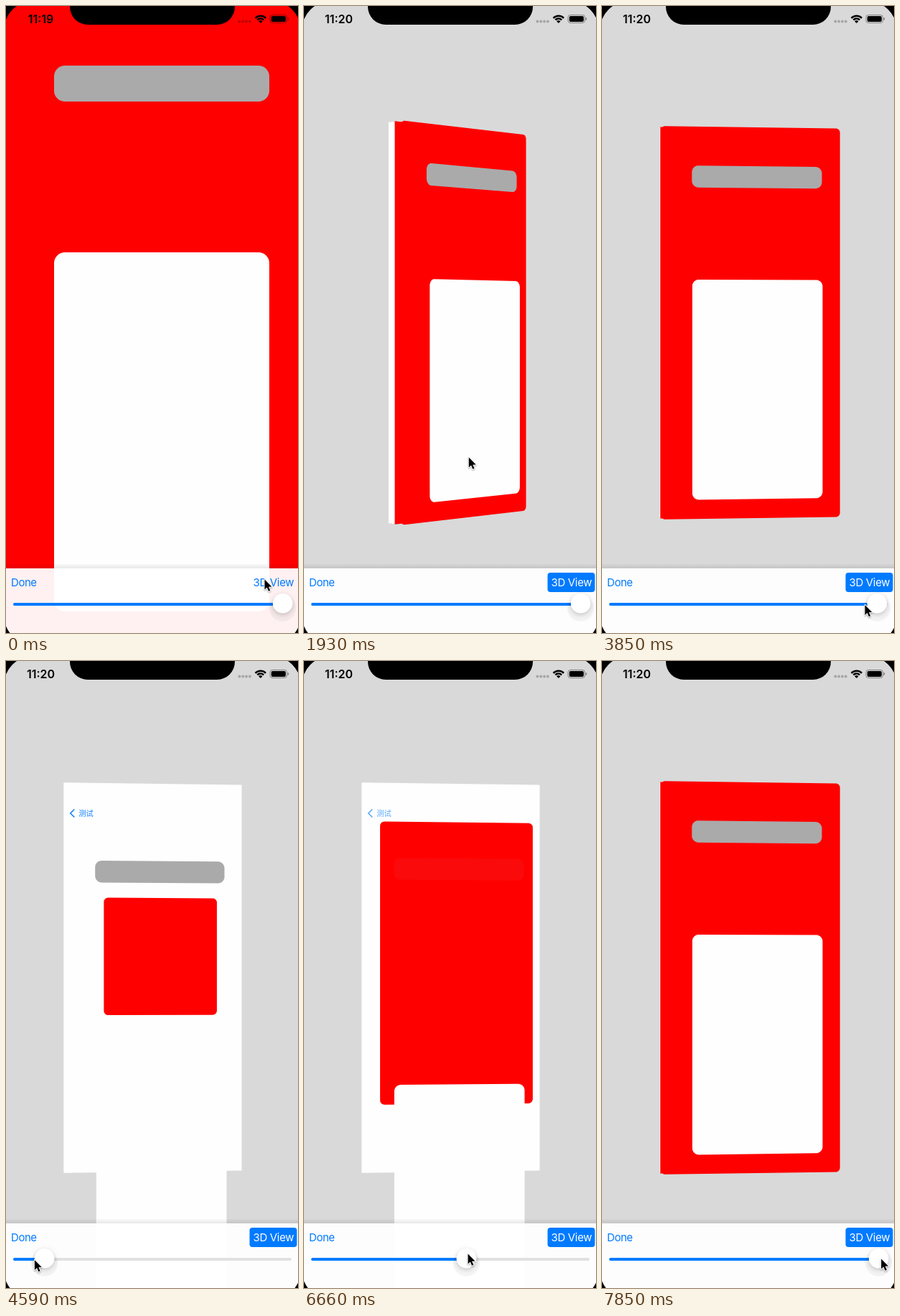
An HTML page with a canvas that plays this animation: 407 px wide and 873 px high, repeating every 8000 ms.

```html
<!DOCTYPE html>
<html lang="en">
<head>
<meta charset="utf-8">
<title>Layered transition inspector</title>
<style>
html, body { margin: 0; width: 100%; height: 100%; overflow: hidden; background: #000; }
canvas { display: block; width: 407px; height: 873px; }
</style>
</head>
<body>
<canvas id="stage"></canvas>
<script>
const W = 407, H = 873, LOOP = 8000;
const CX = 204, CY = 441, SW = 414, SH = 896;
const BLUE = '#007aff', RED = '#f00', WHITE = '#fefefe', GREY = '#aaa';
const canvas = document.getElementById('stage');
const dpr = window.devicePixelRatio || 1;
canvas.width = Math.round(W * dpr);
canvas.height = Math.round(H * dpr);
const g = canvas.getContext('2d');

const mix = (a, b, k) => a + (b - a) * k;
const clamp = v => Math.max(0, Math.min(1, v));

// Eased 0..1 between two times
function ramp(t, from, to) {
  const v = clamp((t - from) / (to - from));
  return v * v * (3 - 2 * v);
}

// Pictures are held for about 148 ms each.
function hold(t) {
  if (t < 300) return 0;
  const step = 148.04;
  return 300 + Math.min(51, Math.floor((t - 292) / step)) * step;
}

function pose(t) {
  const open = ramp(t, 240, 680);
  const turn = ramp(t, 1200, 1930), back = ramp(t, 1930, 2600);
  const pull = ramp(t, 3815, 4590), rest = ramp(t, 4740, 5400);
  const push = ramp(t, 5630, 6660), finish = ramp(t, 6810, 7700);

  const degrees = 30 + 15.5 * turn - 38.5 * back;
  const slider = 1 - .917 * pull - .083 * rest + .56 * push + .44 * finish;
  const knob = mix(23.5, 385.7, slider);

  // The pointer turns the layers, then holds the slider knob.
  const reach = ramp(t, 300, 740), grab = ramp(t, 2700, 3560);
  const spinX = mix(360, 175, reach) + (degrees - 30) * 3.5;
  const spinY = mix(798, 639, reach) - 11 * turn;
  const gripX = knob - 17.5 + 20.5 * ramp(t, 3700, 7200);
  const gripY = 833.5 - 8.5 * push + 7 * finish;

  return {
    open, knob,
    angle: degrees * open * Math.PI / 180,
    progress: clamp(slider * 1.01),
    x: mix(spinX, gripX, grab),
    y: mix(spinY, gripY, grab)
  };
}

let view;

function project(x, y, z) {
  z *= view.depth;
  const w = 1 - (z * view.cos - x * view.sin) / 4000;
  const k = view.scale / w;
  return [CX + (x * view.cos + z * view.sin) * k, CY + y * k];
}

function layer(x, y, w, h, r, z, color, alpha = 1) {
  if (alpha <= 0) return;
  const corners = [[x + w - r, y + r], [x + w - r, y + h - r], [x + r, y + h - r], [x + r, y + r]];
  g.beginPath();
  corners.forEach(([cx, cy], i) => {
    for (let n = 0; n <= 8; n++) {
      const a = (i - 1 + n / 8) * Math.PI / 2;
      g.lineTo(...project(cx + r * Math.cos(a), cy + r * Math.sin(a), z));
    }
  });
  g.closePath();
  g.globalAlpha = alpha;
  g.fillStyle = color;
  g.fill();
  g.globalAlpha = 1;
}

function box(x, y, w, h, r, color) {
  g.beginPath();
  g.roundRect(x, y, w, h, r);
  g.fillStyle = color;
  g.fill();
}

function disc(x, y, r, color) {
  g.beginPath();
  g.arc(x, y, r, 0, Math.PI * 2);
  g.fillStyle = color;
  g.fill();
}

function label(text, x, y, font, color, align = 'left', spacing = '0px') {
  g.font = font;
  g.fillStyle = color;
  g.textAlign = align;
  g.letterSpacing = spacing;
  g.fillText(text, x, y);
}

function backButton(p) {
  if (p > .99) return;
  g.globalAlpha = 1 - .6 * p;
  g.strokeStyle = BLUE;
  g.lineWidth = 1.6;
  g.beginPath();
  g.moveTo(95.3, 206.5);
  g.lineTo(89.8, 212);
  g.lineTo(95.3, 217.5);
  g.stroke();
  label('测试', 101.3, 215.7, '10.3px "Noto Sans CJK SC", "Noto Sans CJK", sans-serif', BLUE);
  g.globalAlpha = 1;
}

function scene(p) {
  const full = [-SW / 2, -SH / 2, SW, SH];
  const grow = p + .32 * p * (1 - p);
  const late = p ** 5;
  const w = mix(243, SW, grow), h = mix(192, SH, grow);
  const x = 13 * (1 - p * p), y = -49 * (1 - p * p);
  const barY = mix(-268, -358, late);

  layer(...full, 0, 10, WHITE);
  layer(...full, 0, 20, WHITE);
  backButton(p);
  layer(...full, 0, 30, RED, clamp((p - .97) / .02));
  layer(-137, barY, 300, 50, 15, 40, GREY);
  layer(x - w / 2, y - h / 2, w, h, 10, 50, RED);
  layer(-137, barY, 300, 50, 15, 60, GREY, late);
  layer(-137, mix(264, -98, late), 300, 500, 15, 70, WHITE);
}

function toolbar(knob, on) {
  const shade = g.createLinearGradient(0, 777, 0, 783);
  shade.addColorStop(0, 'rgba(0,0,0,.02)');
  shade.addColorStop(1, 'rgba(0,0,0,.09)');
  g.fillStyle = shade;
  g.fillRect(0, 777, W, 6);
  g.fillStyle = 'rgba(255,255,255,.945)';
  g.fillRect(0, 783, W, 90);

  const font = '15px Inter, sans-serif';
  label('Done', 7, 808, font, BLUE, 'left', '-0.45px');
  if (on) box(339.5, 789, 66, 27, 4, BLUE);
  label('3D View', 344.6, 808, font, on ? '#fff' : BLUE, 'left', '-0.35px');

  box(10, 831, 388, 4, 2, '#e1e1e2');
  box(10, 831, knob - 10, 4, 2, BLUE);
  disc(knob, 838.5, 18.5, 'rgba(0,0,0,.04)');
  g.save();
  g.shadowColor = 'rgba(0,0,0,.2)';
  g.shadowBlur = 6 * dpr;
  g.shadowOffsetY = 2 * dpr;
  disc(knob, 831.8, 13.8, '#fff');
  g.restore();
}

function statusBar(time) {
  label(time, 48.5, 23.5, '600 16px Inter, sans-serif', '#000', 'center');
  for (let i = 0; i < 4; i++) disc(325.4 + i * 4.8, 21.5, 1.9, 'rgba(0,0,0,.24)');

  g.strokeStyle = '#000';
  g.lineWidth = 2.5;
  for (const r of [6.2, 10.1]) {
    g.beginPath();
    g.arc(354.8, 23.8, r, -Math.PI * .755, -Math.PI * .245);
    g.stroke();
  }
  g.beginPath();
  g.moveTo(354.8, 24);
  g.arc(354.8, 24, 3.8, -Math.PI * .755, -Math.PI * .245);
  g.fillStyle = '#000';
  g.fill();

  g.strokeStyle = 'rgba(0,0,0,.4)';
  g.lineWidth = 1;
  g.beginPath();
  g.roundRect(368, 12.5, 23.5, 11, 3.3);
  g.stroke();
  box(369.7, 14.1, 20.2, 7.8, 2, '#000');
  box(392.7, 16, 1.4, 4, [0, 1.4, 1.4, 0], 'rgba(0,0,0,.45)');
}

function bezel() {
  box(89, -30, 230, 56, 25, '#000');
  g.beginPath();
  g.rect(-20, -20, W + 40, H + 40);
  g.roundRect(CX - SW / 2, CY - SH / 2, SW, SH, 41);
  g.fillStyle = '#000';
  g.fill('evenodd');
}

function cursor(x, y) {
  g.save();
  g.translate(x, y);
  g.beginPath();
  [[.5, .5], [.5, 14.5], [3.7, 11.5], [6, 16.8], [8.3, 15.8], [6, 10.7], [10.4, 10.5]]
    .forEach(pt => g.lineTo(...pt));
  g.closePath();
  g.lineJoin = 'round';
  g.lineWidth = 2;
  g.strokeStyle = '#fff';
  g.shadowColor = 'rgba(0,0,0,.35)';
  g.shadowBlur = 2 * dpr;
  g.shadowOffsetY = dpr;
  g.stroke();
  g.shadowColor = 'transparent';
  g.fillStyle = '#000';
  g.fill();
  g.restore();
}

function draw(now) {
  const t = hold(now % LOOP);
  const { open, angle, progress, knob, x, y } = pose(t);
  view = { scale: mix(1, .6, open), sin: Math.sin(angle), cos: Math.cos(angle), depth: open };

  g.setTransform(dpr, 0, 0, dpr, 0, 0);
  g.fillStyle = '#d9d9d9';
  g.fillRect(0, 0, W, H);
  scene(progress);
  toolbar(knob, t >= 300);
  statusBar(t < 1480 ? '11:19' : '11:20');
  bezel();
  cursor(x, y);
}

const start = performance.now();
function tick() {
  draw(performance.now() - start);
  requestAnimationFrame(tick);
}
tick();
</script>
</body>
</html>
```
